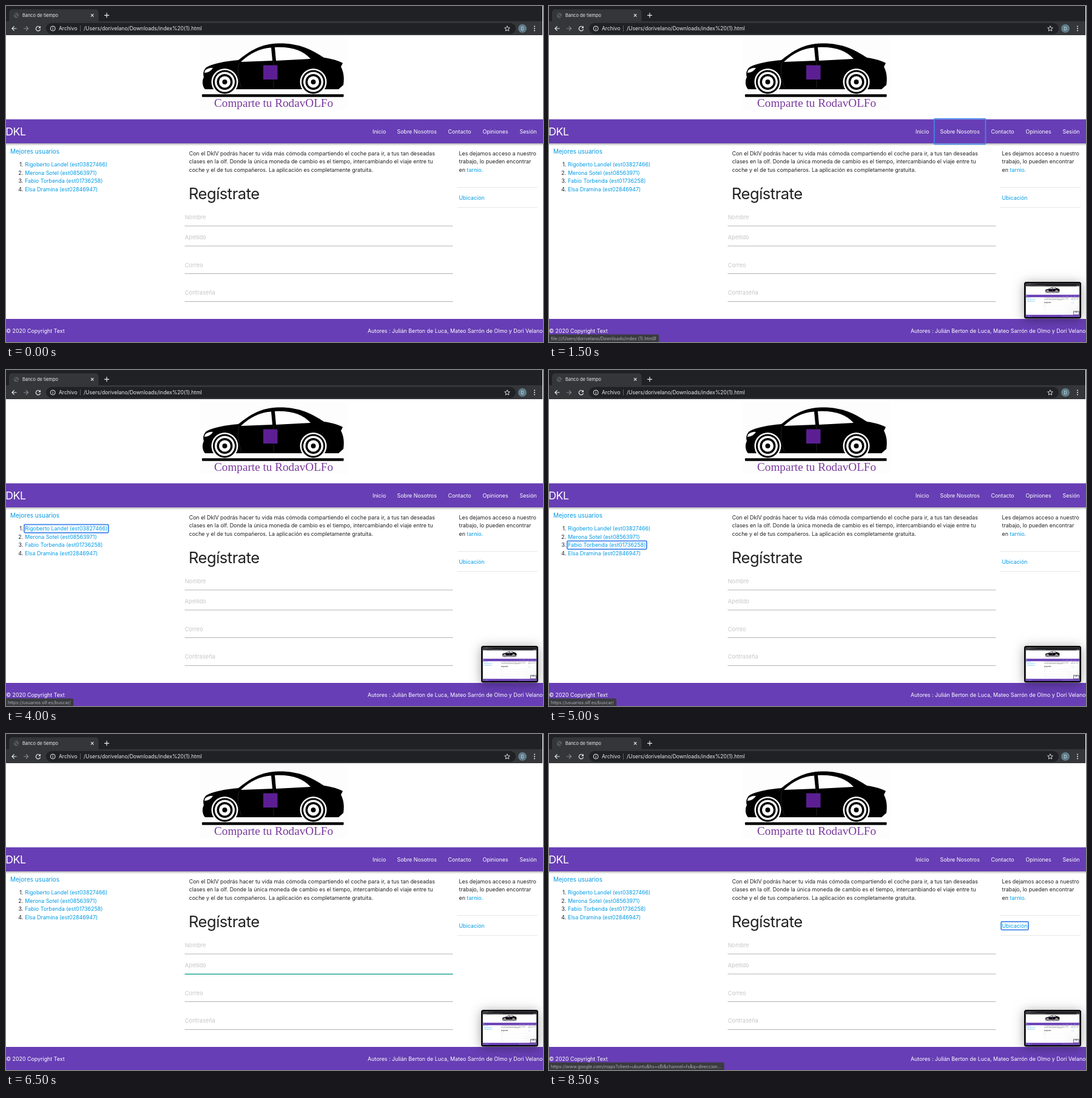
Recreate the animation shown at these times as an HTML page with a canvas. Size 885x553 px, loop 9 s.

```html
<!DOCTYPE html>
<html lang="es">
<head>
<meta charset="utf-8">
<title>Banco de tiempo</title>
<style>
html, body { margin: 0; width: 100%; height: 100%; overflow: hidden; background: #fff; }
canvas { display: block; width: 885px; height: 553px; }
</style>
</head>
<body>
<canvas id="stage"></canvas>
<script>
const W = 885, H = 553, LOOP = 9000, STEP = 500;
const PURPLE = '#673eb5', LINK = '#039be5', INK = '#212121', TEAL = '#26a69a';
const BODY = 8.87;

const canvas = document.getElementById('stage');
const ratio = window.devicePixelRatio || 1;
canvas.width = W * ratio;
canvas.height = H * ratio;
const ctx = canvas.getContext('2d');

const FILE_URL = 'file:///Users/dorivelano/Downloads/index (1).html#';
const USER_URL = 'https://usuarios.olf.es/buscar/';
const REPO_URL = 'https://tarnio.com/dorivelano/dklv';
const MAP_URL = 'https://www.google.com/maps?client=ubuntu&hs=sBi&channel=fs&q=direccion...';

const nav = [['Inicio', 604], ['Sobre Nosotros', 644.5], ['Contacto', 728.5], ['Opiniones', 785.5], ['Sesión', 846.5]];
const users = ['Rigoberto Landel (est03827466)', 'Merona Sotel (est08563971)',
  'Fabio Torbenda (est01736258)', 'Elsa Dramina (est02846947)'];
const fields = [['Nombre', 348, 362], ['Apellido', 381, 395], ['Correo', 426.5, 440.5], ['Contraseña', 472, 486.5]];

// Tab order of the page: one stop per step, after an idle first step.
const stops = [
  {},
  { bar: ['DKL', 0, 17.8], url: FILE_URL },
  ...nav.map(([label, x]) => ({ bar: [label, x, BODY], url: FILE_URL })),
  { link: ['Mejores usuarios', 7, 239, 10], url: USER_URL },
  ...users.map((name, i) => ({ link: [name, 31.3, userY(i), BODY], url: i < 3 ? USER_URL : '' })),
  ...fields.map((f, i) => ({ field: i })),
  { link: ['tarnio.', 759.5, 269.5, BODY], url: REPO_URL },
  { link: ['Ubicación', 746.5, 315.5, BODY], url: MAP_URL }
];

function userY(i) { return 261 + i * 13.5; }

function setFont(size, family = 'Inter, sans-serif') { ctx.font = `${size}px ${family}`; }

// y is the middle of the capitals
function text(str, x, y, size = BODY, color = INK, align = 'left') {
  setFont(size);
  ctx.textAlign = align;
  ctx.fillStyle = color;
  ctx.fillText(str, x, y + size * 0.364);
}

function tightText(str, x, y, size, color, spacing) {
  ctx.letterSpacing = `${size * spacing}px`;
  text(str, x, y, size, color);
  ctx.letterSpacing = '0px';
}

function widthOf(str, size) {
  setFont(size);
  return ctx.measureText(str).width;
}

function rect(x, y, w, h, color) {
  ctx.fillStyle = color;
  ctx.fillRect(x, y, w, h);
}

function round(x, y, w, h, r, color) {
  ctx.beginPath();
  ctx.roundRect(x, y, w, h, r);
  ctx.fillStyle = color;
  ctx.fill();
}

function disc(x, y, r, color) {
  ctx.beginPath();
  ctx.arc(x, y, r, 0, 7);
  ctx.fillStyle = color;
  ctx.fill();
}

function shape(d, color) {
  ctx.fillStyle = color;
  ctx.fill(new Path2D(d));
}

function stroke(d, color, width = 1.1) {
  ctx.strokeStyle = color;
  ctx.lineWidth = width;
  ctx.stroke(new Path2D(d));
}

function ring(x, y, w, h, r) {
  ctx.beginPath();
  ctx.roundRect(x, y, w, h, r);
  ctx.strokeStyle = '#4285e8';
  ctx.lineWidth = 1.8;
  ctx.stroke();
}

function drawBrowser() {
  const pale = '#e8eaed', dim = '#85888c';
  rect(0, 0, W - 1, 25, '#202124');
  rect(0, 25, W - 1, 23, '#35363a');
  round(5, 5.5, 147.5, 20, [5, 5, 0, 0], '#35363a');
  disc(17, 15.5, 4.3, '#55585c');
  stroke('M13.5 14 Q16 13 17 15.5 T20.5 17.5', '#35363a', 1.2);
  text('Banco de tiempo', 27, 15.3, 7.4, pale);
  stroke('M140 13.2 l4.4 4.4 m0 -4.4 l-4.4 4.4', pale);
  stroke('M162 15.3 h8 m-4 -4 v8', pale, 1.2);

  stroke('M17.5 37 h-7.5 m3.6 -3.7 l-3.7 3.7 l3.7 3.7', pale, 1.2);
  stroke('M29 37 h7.5 m-3.6 -3.7 l3.7 3.7 l-3.7 3.7', dim, 1.2);
  stroke('M56 35 A3.7 3.7 0 1 0 56.6 38.2', pale, 1.2);
  shape('M57 32.8 v3.8 h-3.8 z', pale);

  round(66, 28, 774, 18, 9, '#202124');
  stroke('M73.2 37 a4 4 0 1 0 8 0 a4 4 0 1 0 -8 0 M77.2 36.4 v2.8 M77.2 34.3 v1.1', pale, 1);
  text('Archivo', 87, 37, 8.5, pale);
  rect(122.2, 32, 0.8, 10, '#6b6e72');
  text('/Users/dorivelano/Downloads/index%20(1).html', 128, 37, 8.6, pale);
  stroke('M826 32.8 l1.2 2.9 3.1 .3 -2.4 2 .8 3.1 -2.7 -1.7 -2.7 1.7 .8 -3.1 -2.4 -2 3.1 -.3 z', pale, 0.9);
  disc(851, 37, 7, '#607d8b');
  text('D', 851, 37, 7, '#dfe6ea', 'center');
  for (const dy of [-3.4, 0, 3.4]) disc(871, 37 + dy, 1, pale);
}

function drawWheel(x) {
  const bands = [[22, '#fff'], [19.5, '#000'], [16.5, '#fff'], [13, '#000'], [9.5, '#fff'], [4, '#000']];
  for (const [r, color] of bands) disc(x, 125, r, color);
}

function drawBanner() {
  rect(320, 53, 243, 118, '#fdfdfd');
  shape('M330 101 C342 94 362 91 383 89 C402 74 420 62 449 61.5 C484 61 504 72 524 85 ' +
    'C538 87 548 90 555 94 L552 100 C556 108 558 117 556 130 L548 137 H328 ' +
    'C323 131 323 123 326 117 C324 110 326 105 330 101 Z', '#000');
  shape('M387 92 C402 78 418 69.5 437 68.5 L439 90 Z', '#fff');
  shape('M443 68 C470 66.5 489 73 502 87 L445 90 Z', '#fff');
  shape('M328 106 Q335 101 341 102 Q337 109 327 110 Z', '#fff');
  stroke('M384 93 Q379 113 388 134 M441 91 V134', '#333', 0.7);
  drawWheel(360.5);
  drawWheel(506.5);
  round(323, 145.3, 233.5, 4.4, 1, '#000');
  rect(424, 97.5, 23.5, 23.5, '#5c1f93');
  setFont(19.2, '"Liberation Serif", "Times New Roman", serif');
  ctx.textAlign = 'left';
  ctx.fillStyle = '#7a3a9e';
  ctx.fillText('Comparte tu RodavOLFo', 343, 166);
}

function drawNav() {
  const shade = ctx.createLinearGradient(0, 226, 0, 230);
  shade.addColorStop(0, 'rgba(0,0,0,.3)');
  shade.addColorStop(1, 'rgba(0,0,0,0)');
  rect(0, 226, W, 4, shade);
  rect(0, 186.5, W, 39.5, PURPLE);
  tightText('DKL', -0.8, 206.8, 17.8, '#fff', -0.03);
  for (const [label, x] of nav) text(label, x, 207, BODY, '#fff');
}

function drawColumns(focusField) {
  text('Mejores usuarios', 7, 239, 10, LINK);
  users.forEach((name, i) => {
    text(`${i + 1}.`, 28.3, userY(i), BODY, INK, 'right');
    text(name, 31.3, userY(i), BODY, LINK);
  });

  ['Con el DklV podrás hacer tu vida más cómoda compartiendo el coche para ir, a tus tan deseadas',
    'clases en la olf. Donde la única moneda de cambio es el tiempo, intercambiando el viaje entre tu',
    'coche y el de tus compañeros. La aplicación es completamente gratuita.'
  ].forEach((line, i) => text(line, 301.7, 242.5 + i * 13.5));
  tightText('Regístrate', 301, 309, 25.6, INK, -0.02);

  fields.forEach(([label, y, lineY], i) => {
    const on = i === focusField;
    text(label, 294.7, y, 9.2, '#c6c6c6');
    rect(294.5, lineY - 0.5, 442, on ? 1.5 : 1, on ? TEAL : '#b4b4b4');
  });

  ['Les dejamos acceso a nuestro', 'trabajo, lo pueden encontrar', 'en']
    .forEach((line, i) => text(line, 746.5, 242.5 + i * 13.5));
  text('tarnio.', 759.5, 269.5, BODY, LINK);
  rect(743.5, 298.3, 132.5, 0.8, '#e2e2e2');
  rect(743.5, 331.2, 132.5, 0.8, '#e2e2e2');
  text('Ubicación', 746.5, 315.5, BODY, LINK);
}

function drawFooter() {
  rect(0, 515, W, 38, PURPLE);
  text('© 2020 Copyright Text', 0, 534.5, BODY, '#fff');
  text('Autores : Julián Berton de Luca, Mateo Sarrón de Olmo y Dori Velano', 884.5, 534.5, BODY, '#fff', 'right');
}

function drawFocus({ bar, link }) {
  if (bar) {
    const [label, x, size] = bar;
    const pad = x ? 9.6 : 1;
    ring(x - pad, 185.7, widthOf(label, size) + pad * 2, 41.6, 1);
  }
  if (link) {
    const [label, x, y, size] = link;
    ring(x - 1.3, y - 6.6, widthOf(label, size) + 2.8, 13.4, 1.5);
  }
}

function drawStatus(url) {
  if (!url) return;
  const w = widthOf(url, 7.3) + 7.5;
  round(0, 540.5, w, 13, [0, 3, 0, 0], '#3a3b3f');
  text(url, 3, 547, 7.3, '#a9adb2');
}

function drawThumb(depth) {
  ctx.save();
  ctx.shadowColor = 'rgba(0,0,0,.36)';
  ctx.shadowBlur = 18 * ratio;
  ctx.shadowOffsetY = 2 * ratio;
  round(783, 454, 94, 60.5, 3.5, '#08080a');
  ctx.restore();
  ctx.save();
  ctx.translate(785.5, 456.5);
  ctx.scale(89 / W, 89 / W);
  ctx.beginPath();
  ctx.rect(0, 0, W, H);
  ctx.clip();
  drawScene({}, depth);
  ctx.restore();
}

function drawScene(stop, depth) {
  rect(0, 0, W, H, '#fff');
  drawBanner();
  drawBrowser();
  drawNav();
  drawColumns(stop.field);
  drawFooter();
  drawFocus(stop);
  drawStatus(stop.url);
  if (depth > 0) drawThumb(depth - 1);
}

function frame() {
  const step = Math.floor((performance.now() % LOOP) / STEP);
  ctx.setTransform(ratio, 0, 0, ratio, 0, 0);
  drawScene(stops[step], step ? 2 : 0);
  requestAnimationFrame(frame);
}
frame();
</script>
</body>
</html>
```
